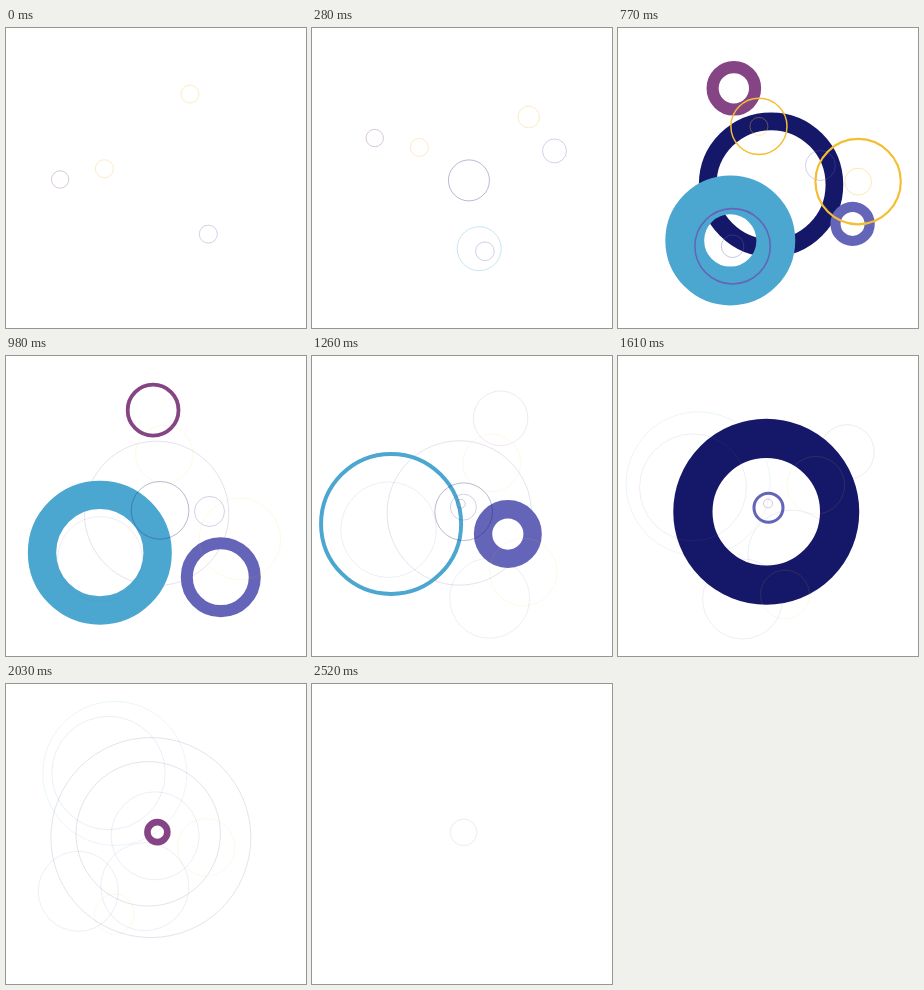
Write an HTML page with a canvas that moves like this. It is 300 px wide and 300 px high and loops after 2.94 s.

```html
<!DOCTYPE html>
<html lang="en">
<head>
<meta charset="utf-8">
<title>Orbiting rings</title>
<style>
  html, body { margin: 0; width: 100%; height: 100%; overflow: hidden; background: #fff; }
  canvas { display: block; width: 300px; height: 300px; }
</style>
</head>
<body>
<canvas id="stage" width="300" height="300"></canvas>
<script>
const ctx = document.getElementById('stage').getContext('2d');
const LOOP = 2940, STEP = 70, LAST = 2520, SPIN_END = 2135, SPIN = 0.0912, CENTER = 149.8;
const navy = '#151869', purple = '#854585', yellow = '#f5be32', violet = '#6464b8', sky = '#4ca7d0';

// dist/angle: place on the turning disc; r0 -> r1: radius; start/span: growth in ms
const ring = (color, dist, angle, r0, r1, start, span, extra) =>
  ({ color, dist, angle, r0, r1, start, span, born: start - 480, gone: SPIN_END, keys: [[0, 1]], ...extra });

const rings = [
  ring(navy, 7.6, -5.5, 20.5, 72.2, 529, 380),
  ring(sky, 73, 50.7, 22, 72, 560, 840),
  ring(purple, 95.7, 179, 8.7, 27.3, 428, 760, { born: 0, gone: 1650 }),
  ring(violet, 96.5, -41.7, 12, 40, 736, 420),
  ring(violet, 54, -83.4, 15, 44, 1194, 400),
  ring(navy, 6.2, -42.5, 31, 100, 1316, 620, { keys: [[1610, 0.93], [2030, 1]] }),
  ring(violet, 2.1, -76, 13, 44, 1602, 400),
  ring(purple, 2.3, 128, 4.5, 13.3, 1732, 780, { gone: LOOP }),
  ring(yellow, 52.2, 190, 9, 28.8, 552, 260, { born: 0, trace: true }),
  ring(yellow, 90.4, -67.8, 9, 29.3, 553, 258, { born: 0, trace: true, keys: [[0, 1], [650, 1.51], [1990, 0.68]] }),
  ring(violet, 77, 47, 9, 30.7, 551, 255, { born: 0, trace: true, keys: [[0, 1], [2100, 1.85]] }),
];

const clamp = x => Math.min(1, Math.max(0, x));
const easeOut = x => 1 - (1 - clamp(x)) ** 2;
const easeInOut = x => (1 - Math.cos(Math.PI * clamp(x))) / 2;
const mix = (a, b, p) => a + (b - a) * p;

function scaleAt(keys, t) {
  let value = keys[0][1];
  for (let i = 1; i < keys.length; i++) {
    const [from] = keys[i - 1], [to, next] = keys[i];
    value = mix(value, next, easeInOut((t - from) / (to - from)));
  }
  return value;
}

function circle(x, y, r, color, width, alpha = 1) {
  ctx.globalAlpha = alpha;
  ctx.strokeStyle = color;
  ctx.lineWidth = width;
  ctx.beginPath();
  ctx.arc(x, y, r, 0, Math.PI * 2);
  ctx.stroke();
}

function drawRing(o, t) {
  if (t < o.born || t > o.gone) return;
  const angle = (o.angle + SPIN * Math.min(t, SPIN_END)) * Math.PI / 180;
  const x = CENTER + o.dist * Math.cos(angle), y = CENTER + o.dist * Math.sin(angle);
  const scale = scaleAt(o.keys, t);
  const u = (t - o.start) / o.span;
  const outer = scale * mix(o.r0, o.r1, easeOut(u / 0.4));
  const inner = scale * mix(o.r0, o.r1, easeInOut((u - 0.08) / 0.92));
  const width = outer - inner;
  if (width > 0.5) {
    circle(x, y, (outer + inner) / 2, o.color, width);
    if (o.trace && u > 0.2) circle(x, y, o.r0 * scale, o.color, 0.6, 0.6);
  } else {
    circle(x, y, outer, o.color, 0.6, u < 0.5 ? 0.5 : 0.2);
  }
}

function frame(now) {
  const t = Math.min(LAST, Math.floor(now % LOOP / STEP) * STEP);
  ctx.globalAlpha = 1;
  ctx.fillStyle = '#fff';
  ctx.fillRect(0, 0, 300, 300);
  rings.forEach(o => drawRing(o, t));
  requestAnimationFrame(frame);
}
requestAnimationFrame(frame);
</script>
</body>
</html>
```
